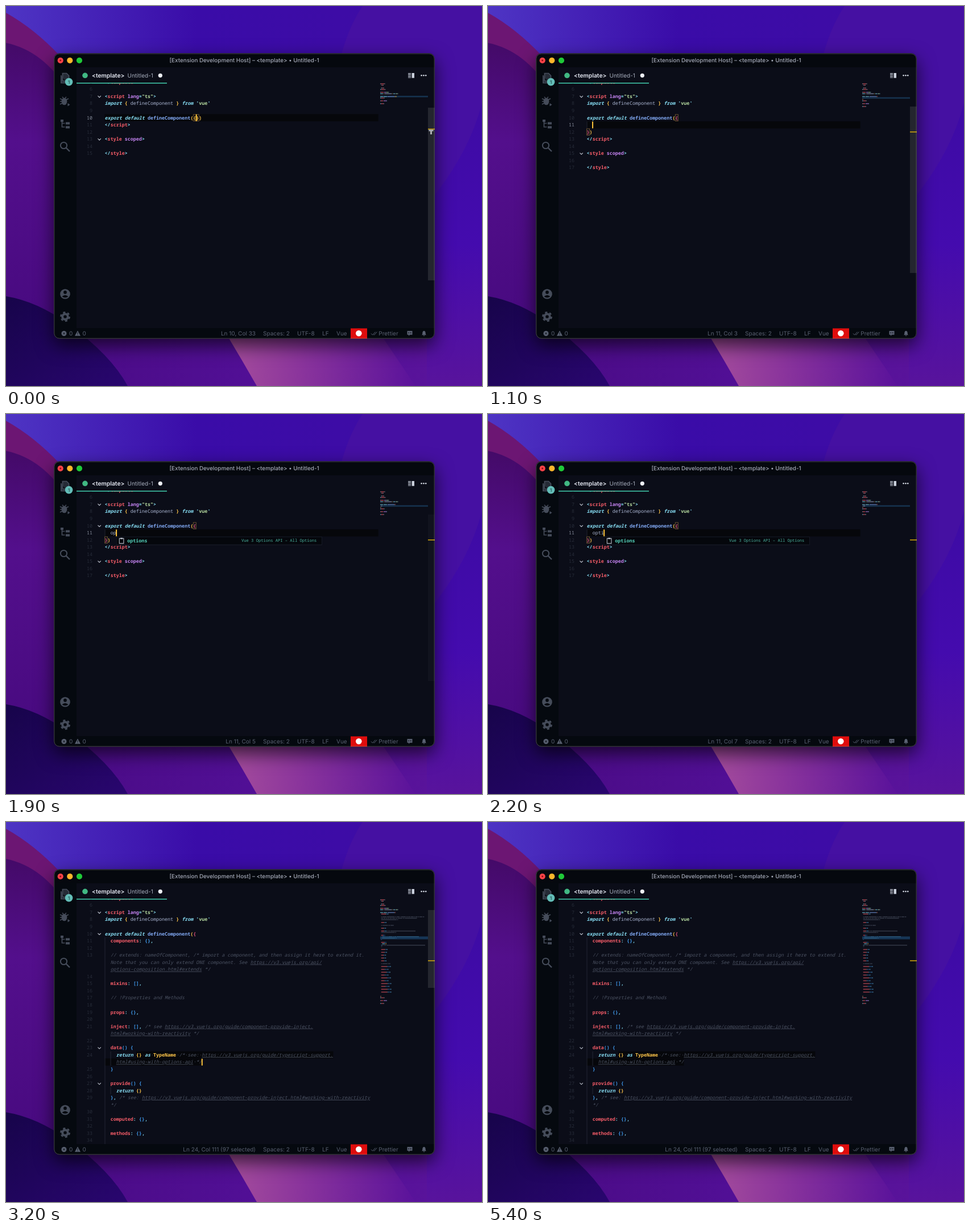
Animation, 837 px wide and 669 px high, one loop 5690 ms. Source, as an HTML page:

```html
<!DOCTYPE html>
<html lang="en">
<head>
<meta charset="utf-8">
<title>Snippet completion</title>
<style>
html, body { margin: 0; width: 100%; height: 100%; overflow: hidden; background: #3a0ca3; }
svg { display: block; }
text { white-space: pre; text-rendering: geometricPrecision; }
.ui { font-family: Inter, sans-serif; font-size: 10px; }
.code { font: 500 8.37px "Noto Sans Mono", monospace; }
.code .num { fill: #272c39; text-anchor: end; }
.code .num.on { fill: #858b99; }
.c { fill: #86dcf2; font-weight: 600; }
.r { fill: #f45c68; font-weight: 700; }
.p { fill: #c383f0; font-weight: 700; }
.s { fill: #b6dba0; font-weight: 600; }
.k { fill: #86dcf2; font-weight: 700; font-style: italic; }
.y { fill: #ffc64a; font-weight: 700; }
.d { fill: #a9b4d0; }
.f { fill: #82aaf5; font-weight: 600; }
.b { fill: #3f98ea; font-weight: 600; }
.m { fill: #e0527e; font-weight: 700; }
.g, .u { fill: #4c5363; font-style: italic; }
.u { text-decoration: underline; text-underline-offset: 1.2px; }
.label { fill: #bcc4d6; font-weight: 600; }
.hit { fill: #55d3bc; font-weight: 700; }
.desc { font-size: 7.12px; fill: #858d9e; text-anchor: end; }
.desc.sel { fill: #4bb39f; }
.status { fill: #596071; }
.icon { fill: none; stroke: #454c5a; stroke-width: 1.7; }
.window { filter: drop-shadow(0 12px 16px #000a); }
</style>
</head>
<body>
<svg width="837" height="669" viewBox="0 0 837 669">
  <defs>
    <linearGradient id="sky"><stop stop-color="#4e35c4"/><stop offset=".4" stop-color="#3a0ca8"/><stop offset="1" stop-color="#400ca4"/></linearGradient>
    <linearGradient id="left" x2="0" y2="1"><stop stop-color="#440a68"/><stop offset=".35" stop-color="#530f8c"/><stop offset="1" stop-color="#480a80"/></linearGradient>
    <linearGradient id="night" x2="1" y2="1"><stop stop-color="#17044a"/><stop offset="1" stop-color="#29066f"/></linearGradient>
    <linearGradient id="floor"><stop stop-color="#480a80"/><stop offset=".5" stop-color="#510f95"/><stop offset="1" stop-color="#5b149c"/></linearGradient>
    <linearGradient id="rose"><stop stop-color="#a54d9c"/><stop offset=".4" stop-color="#8a349c"/><stop offset="1" stop-color="#5a129b"/></linearGradient>
    <linearGradient id="right" x2="0" y2="1"><stop stop-color="#3d0ba4"/><stop offset=".5" stop-color="#440bae"/><stop offset="1" stop-color="#58139c"/></linearGradient>
    <clipPath id="pane"><path d="M124 136.5H742V567H124Z"/></clipPath>
  </defs>

  <path d="M0 0H837V669H0Z" fill="url(#sky)"/>
  <path d="M0 12Q50 40 95 88L110 400H0Z" fill="#6c1673"/>
  <path d="M0 500H837V669H0Z" fill="url(#floor)"/>
  <path d="M0 65Q65 78 110 150V560H0Z" fill="url(#left)"/>
  <path d="M0 511Q55 520 110 560Q185 615 214 669H0Z" fill="url(#night)"/>
  <path d="M389 580Q416 625 441 669H720L660 580Z" fill="url(#rose)"/>
  <path d="M627 0Q600 40 586 100H740V400H837V0Z" fill="#4510a2"/>
  <path d="M837 170Q815 260 740 350V669H837Z" fill="url(#right)"/>

  <rect class="window" x="84" y="83" width="670" height="503" rx="10" fill="#08060f"/>
  <rect x="85" y="84" width="668" height="501" rx="9" fill="#0b0d18"/>
  <path d="M85 108V93a9 9 0 0 1 9-9H744a9 9 0 0 1 9 9V108Z" fill="#05080e"/>
  <path d="M85 108H124V567H753V576a9 9 0 0 1-9 9H94a9 9 0 0 1-9-9Z" fill="#05090f"/>
  <circle cx="95.7" cy="95.8" r="5.1" fill="#ff4348"/><circle cx="95.7" cy="95.8" r="1.5" fill="#8c1016"/>
  <circle cx="112.3" cy="95.8" r="5.1" fill="#ffb62b"/>
  <circle cx="129" cy="95.8" r="5.1" fill="#1fca38"/>

  <g class="ui">
    <text x="419" y="99.3" text-anchor="middle" font-size="9.85" font-weight="500" fill="#a6abb9">[Extension Development Host] – &lt;template&gt; • Untitled-1</text>
    <circle cx="139" cy="122.3" r="4.8" fill="#41b883"/>
    <text x="151" y="125.8" font-size="10.3" font-weight="600" fill="#e6eaf4">&lt;template&gt;</text>
    <text x="213.5" y="125.8" fill="#a6adbc">Untitled-1</text>
    <circle cx="271.3" cy="122.3" r="3.6" fill="#eceff6"/>
    <path d="M124 135H283V136.5H124Z" fill="#43cfae"/>
  </g>
  <path d="M707 118.8h5M707 121.2h5M707 123.6h5M707 126h5" stroke="#c9cfdb" stroke-width="1.2"/>
  <path d="M713.5 118h4.5v8.7h-4.5Z" fill="#c9cfdb"/>
  <g fill="#d5dae4"><circle cx="730.6" cy="122.3" r="1.3"/><circle cx="734.4" cy="122.3" r="1.3"/><circle cx="738.2" cy="122.3" r="1.3"/></g>

  <g class="icon">
    <path d="M99.5 118.5h7l4 4v9.5h-11ZM97 122v13.5h10" fill="#252b36"/>
    <ellipse cx="102.5" cy="168" rx="4" ry="5.5" fill="#454c5a"/>
    <path d="M95 163l4 2M95 168h4M95 173l4-2M110 163l-4 2M99 160l2 2M106 160l-2 2"/>
    <path d="M108.5 171l4 2.8-4 2.8Z" fill="#454c5a" stroke="none"/>
    <path d="M98.5 203v10h5M98.5 206.5h5"/>
    <path d="M96 200h5v4h-5ZM105 204.5h7v4h-7ZM105 211.5h7v4h-7Z" fill="#454c5a" stroke="none"/>
    <circle cx="101.5" cy="245.5" r="5.6" stroke-width="2"/><path d="M105.5 249.5l6.5 6.5" stroke-width="2.4"/>
    <circle cx="104" cy="507" r="8.8" fill="#454c5a" stroke="none"/>
    <circle cx="104" cy="504" r="2.9" fill="#05090f" stroke="none"/><path d="M98.5 511.5q5.5-5 11 0q-5.5 4-11 0Z" fill="#05090f" stroke="none"/>
    <circle cx="104" cy="547" r="4.8" stroke-width="4"/><circle cx="104" cy="547" r="7.6" stroke-width="2.8" stroke-dasharray="3.98"/>
  </g>
  <circle cx="110.6" cy="133.6" r="6.8" fill="#63bdb7"/>
  <text class="ui" x="110.6" y="136.6" text-anchor="middle" fill="#0b2227" style="font-size:8px">1</text>

  <g class="ui status">
    <circle cx="102" cy="576.5" r="4.5"/><path d="M100.3 574.8l3.4 3.4M103.7 574.8l-3.4 3.4" stroke="#05090f"/>
    <text x="111" y="580">0</text>
    <path d="M126 571.5l5 9.3h-10Z"/><path d="M126 574.5v3M126 578.5v1" stroke="#05090f"/>
    <text x="134.5" y="580">0</text>
    <text id="position" x="439" y="580" text-anchor="end"></text>
    <text x="452" y="580">Spaces: 2</text><text x="512" y="580">UTF-8</text><text x="556" y="580">LF</text><text x="581" y="580">Vue</text>
    <path d="M606 567.5h29v18h-29Z" fill="#df0d0d"/><circle cx="620.3" cy="576.3" r="5.3" fill="#fff"/>
    <path d="M642 576.5l2.5 2.7 5-5.5M646.5 578.5l.8.7 5-5.5" fill="none" stroke="#596071"/>
    <text x="655.3" y="580">Prettier</text>
    <path d="M705.5 572h9v6.8h-4.5l-2 2.2v-2.2h-2.5Z"/><path d="M708.3 574v2.6M711.7 574v2.6" stroke="#05090f"/>
    <path d="M731 579.3q1.5-1 1.3-3.6q.2-3.4 2.7-3.7q2.6.3 2.7 3.7q-.1 2.6 1.3 3.6ZM734 580h2v1h-2Z"/>
  </g>

  <g id="editor" class="code" clip-path="url(#pane)"></g>
  <g id="minimap" opacity=".62"></g>
  <rect id="slider" x="742" width="11.5" fill="#24262f"/>
  <path id="mark" d="M742 0h12" stroke="#d0a20c" stroke-width="1.6"/>
  <path id="pointer" d="M743.5 217.5h8v3h-2.5v5.5h-3v-5.5h-2.5Z" fill="#aeb0b2"/>
  <rect id="cursor" width="2" height="12" fill="#ffc63c"/>
  <g id="popup" class="code"></g>
  <rect x="84.8" y="84" width="668.4" height="501.2" rx="9" fill="none" stroke="#fff" stroke-opacity=".26"/>
</svg>

<script>
const LOOP = 5690, CHAR = 5.022, ROW = 12.55, LEFT = 173.6;
const $ = id => document.getElementById(id);
const esc = s => s.replace(/&/g, '&amp;').replace(/</g, '&lt;').replace(/>/g, '&gt;');
const rowY = row => 146.4 + ROW * (row - 5);
const colX = col => LEFT + CHAR * col;
const rect = (x, y, w, h, rest) => `<rect x="${x}" y="${y}" width="${w}" height="${h}" ${rest}/>`;
const guide = (col, row, rows) => rect(colX(col), rowY(row) - 6, .8, ROW * rows, 'fill="#2a2f3d"');

// Each row is "class~text|class~text"; a leading + marks a wrapped row.
const open = (name, attrs = '') => `c~<|r~${name}${attrs}|c~>`;
const close = name => `c~</|r~${name}|c~>`;
const prop = (name, value = '{}') => `r~  ${name}|c~:|b~ ${value}|c~,`;
const docs = 'https://v3.vuejs.org/';
const component = 'k~export default|f~ defineComponent|y~(';
const head = [
  open('template'), 'c~  <|r~div|c~>', '', 'c~  </|r~div|c~>', close('template'), '',
  open('script', '|p~ lang|c~=|s~"ts"'),
  "k~import|y~ {|d~ defineComponent|y~ }|k~ from|c~ '|s~vue|c~'", ''
];
const tail = [close('script'), '', open('style', '|p~ scoped'), '', close('style')];
const hooks = ['beforeCreate', 'created', 'beforeMount', 'mounted', 'beforeUpdate', 'updated',
  'beforeUnmount', 'unmounted', 'errorCaptured', 'renderTracked'];
const spaced = list => list.flatMap(line => [line, '']);

const closedDoc = [...head, component + '|y~{}|y~)', ...tail];
const openDoc = typed => [...head, component + '|m~{', 'd~  ' + typed, 'm~}|y~)', ...tail];
const fullDoc = [
  ...head, component + '|m~{', prop('components'), '',
  'g~  // extends: nameOfComponent, /* import a component, and then assign it here to extend it.',
  `+g~  Note that you can only extend ONE component. See |u~${docs}api/`,
  '+g~  |u~options-composition.html#extends|g~ */', '',
  ...spaced([prop('mixins', '[]'), 'g~  // !Properties and Methods', prop('props')]),
  prop('inject', '[]') + `|g~ /* see |u~${docs}guide/component-provide-inject.`,
  '+g~  |u~html#working-with-reactivity|g~ */', '',
  'r~  data|b~() {',
  `k~    return|y~ {}|g~·|k~as|g~·|y~TypeName|g~·/*·see:·|u~${docs}guide/typescript-support.`,
  '+g~    |u~html#using-with-options-api|g~·*/',
  'b~  }', '',
  'r~  provide|b~() {', 'k~    return|y~ {}',
  `b~  }|c~,|g~ /* see: |u~${docs}guide/component-provide-inject.html#working-with-reactivity`,
  '+g~  */', '',
  ...spaced(['computed', 'methods', 'watch', 'emits', 'expose'].map(n => prop(n))),
  'g~  // !Lifecycle hooks', '',
  ...spaced(hooks.map(n => prop(n, '() {}'))), '', 'm~}|y~)', ...tail
];

const tokens = line => {
  let col = 0;
  return line.replace(/^\+/, '').split('|').filter(Boolean).map(part => {
    const [kind, text] = part.split('~'), token = { kind, text, col };
    col += text.length;
    return token;
  });
};

const completions = [
  ...['Activated', 'BeforeMount', 'BeforeUnmount', 'BeforeUpdate', 'Deactivated', 'ErrorCaptured',
    'Mounted', 'RenderTracked', 'RenderTriggered', 'Unmounted', 'Updated'].map(n => [`on${n}()`,
    `Vue 3 Composition API – on${n}${n === 'RenderTriggered' ? '' : ' Function'}`]),
  ['options', 'Vue 3 Options API – All Options']
];

const keyTimes = [1700, 1900, 2000, 2200, 2300, 2400, 2600];
const cursorOff = [[1500, 1700], [3900, 4300], [4600, 5000], [5400, LOOP]];

function sceneAt(t) {
  if (t < 1100) return { doc: closedDoc, since: 0, row: 9, col: 32, line: 10, folds: [7, 13],
    boxes: [[9, 31], [9, 32]], bar: [179, 304], mark: 216.7, status: 'Ln 10, Col 33' };
  if (t < 3200) {
    const count = keyTimes.filter(at => t >= at).length, typed = 'options'.slice(0, count);
    return { doc: openDoc(typed), since: 1100, row: 10, col: 2 + count, line: 11, typed,
      folds: t < 1900 ? [7, 15] : [7, 10, 15], boxes: [[9, 31], [11, 0]],
      bar: [177, 293], mark: 221.7, status: `Ln 11, Col ${3 + count}` };
  }
  return { doc: fullDoc, since: 3200, row: 27, col: 34, folds: [7, 10, 23, 27], boxes: [],
    bar: [155, 137], mark: 244.3, status: 'Ln 24, Col 111 (97 selected)', selected: true };
}

function editorMarkup(scene) {
  const { row: active, selected } = scene;
  const shade = (x, row, w) => rect(x, rowY(row) - 6.2, w, ROW, 'fill="#06070b"');
  let out = '', number = 0;
  if (selected) {
    out += shade(colX(11), active - 1, CHAR * 69) + shade(LEFT, active, CHAR * 34);
    out += guide(0, 10, 34) + guide(2, active - 1, 2) + guide(2, 31, 1);
  } else {
    out += shade(LEFT, active, 481);
    if (active === 10) out += guide(0, 10, 1);
  }
  for (const [row, col] of scene.boxes)
    out += rect(colX(col), rowY(row) - 5.6, CHAR, 11.4, 'fill="none" stroke="#806036" stroke-width=".8"');
  scene.doc.forEach((line, row) => {
    const y = rowY(row), base = y + 2.9;
    if (!line.startsWith('+')) {
      number++;
      out += `<text class="num${number === scene.line ? ' on' : ''}" x="152" y="${base}">${number}</text>`;
      if (scene.folds.includes(number))
        out += `<path d="M161.5 ${y - .8}l2.7 2.7 2.7-2.7" fill="none" stroke="#c2c7d2" stroke-width="1.1"/>`;
    }
    out += `<text y="${base}">` + tokens(line).map(k =>
      `<tspan class="${k.kind}" x="${colX(k.col)}">${esc(k.text)}</tspan>`).join('') + '</text>';
  });
  return out;
}

function minimapMarkup({ doc, row: active, selected }) {
  const top = row => 136.2 + 2.5 * row;
  let out = selected
    ? rect(658, top(active - 1) + .3, 84, 5, 'fill="#1d4f7c"')
    : rect(658, top(active) - .6, 84, 2.6, 'fill="#1d4a70"');
  doc.forEach((line, row) => {
    const picked = selected && (row === active || row === active - 1);
    for (const { kind, text, col } of tokens(line))
      for (const word of text.matchAll(/[^ ·]+/g))
        out += rect(658 + .85 * (col + word.index), top(row), .85 * word[0].length, 1.5,
          picked ? 'fill="#3d83b4"' : `class="${kind}"`);
  });
  return out;
}

function popupMarkup({ typed, col }) {
  if (!typed) return '';
  const list = typed.length > 1 ? completions.slice(-1) : completions;
  const x = colX(col) + .6, top = 216.3, step = 12.54;
  let out = rect(x, top, 361, step * list.length + 1.5, 'fill="#0a0c15" stroke="#1b1f2b" stroke-width=".8"');
  list.forEach(([label, desc], i) => {
    const y = top + 6.6 + step * i, sel = i === list.length - 1, hits = sel ? label.length : 1;
    if (sel) out += rect(x + .5, y - 6, 360, 12.3, 'fill="#05070c"');
    out += `<path d="M${x + 5} ${y - 3.8}h7.6v8.8h-7.6Z" fill="none" stroke="#b9bec9" stroke-width="1.1"/>`
      + rect(x + 7, y - 5, 3.6, 2.4, 'fill="#b9bec9"')
      + `<text class="label" x="${x + 19}" y="${y + 2.7}"><tspan class="hit">${label.slice(0, hits)}</tspan>${label.slice(hits)}</text>`
      + `<text class="desc${sel ? ' sel' : ''}" x="${x + 352}" y="${y + 2.5}">${desc}</text>`;
  });
  return out;
}

let shown = '';
function draw(t) {
  const scene = sceneAt(t), key = scene.status + scene.folds;
  const set = (id, attrs) => Object.entries(attrs).forEach(([name, value]) => $(id).setAttribute(name, value));
  if (key !== shown) {
    shown = key;
    $('editor').innerHTML = editorMarkup(scene);
    $('minimap').innerHTML = minimapMarkup(scene);
    $('popup').innerHTML = popupMarkup(scene);
    $('position').textContent = scene.status;
    set('slider', { y: scene.bar[0], height: scene.bar[1] });
    set('mark', { transform: `translate(0 ${scene.mark})` });
    set('cursor', { x: colX(scene.col) - .6, y: rowY(scene.row) - 5.8 });
  }
  // The scrollbar holds briefly after each edit, then fades.
  const fade = 1 - (t - scene.since - 370) / 590;
  set('slider', { opacity: Math.max(0, Math.min(1, fade)) });
  set('pointer', { opacity: t < 1100 ? 1 : 0 });
  set('cursor', { opacity: cursorOff.some(([a, b]) => t >= a && t < b) ? 0 : 1 });
}

const start = performance.now();
function tick() {
  draw((performance.now() - start) % LOOP);
  requestAnimationFrame(tick);
}
tick();
</script>
</body>
</html>
```
